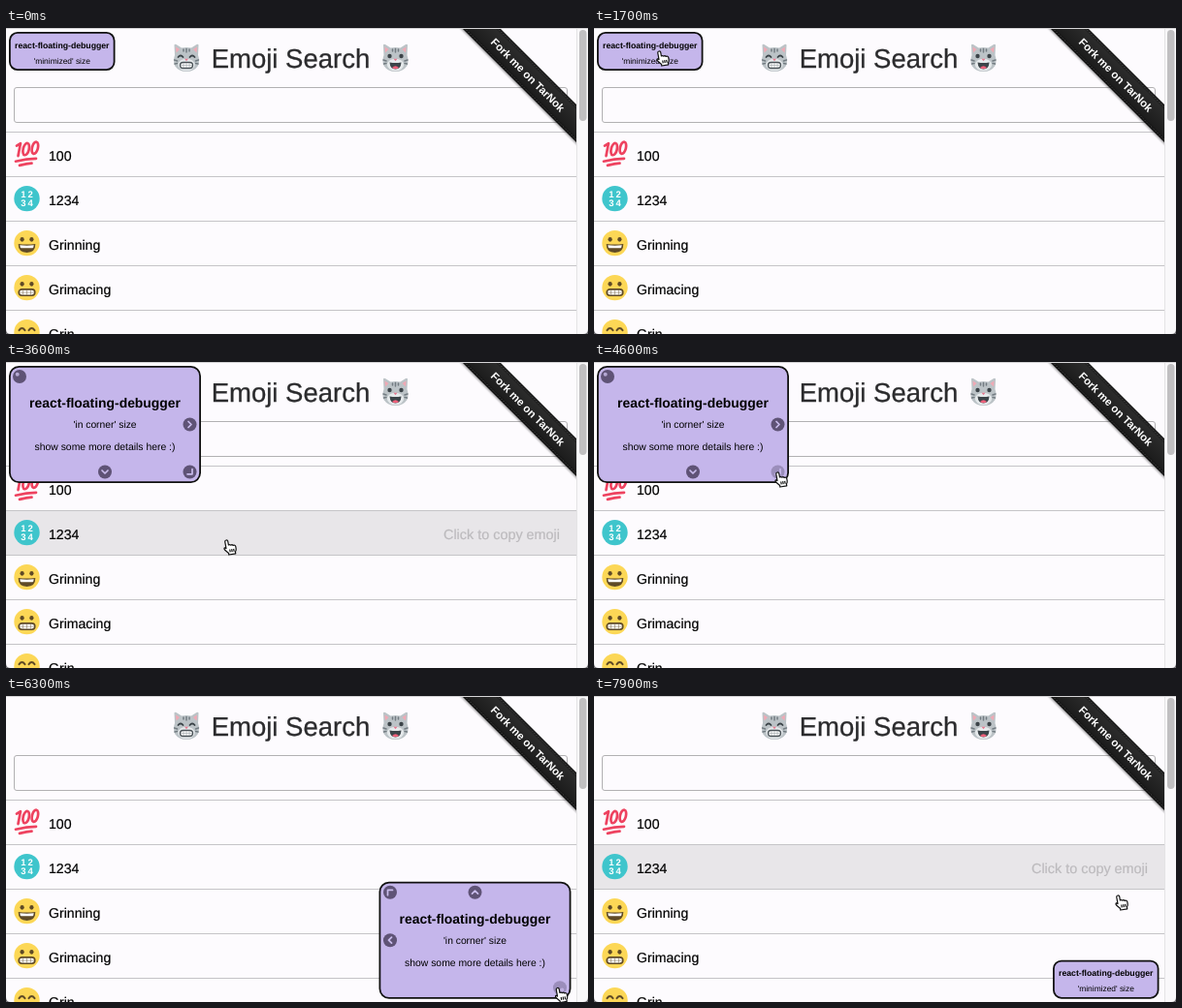
An HTML page for the animation above (8 s loop, 600 by 316 pixels).

```html
<!DOCTYPE html>
<html lang="en">
<head>
<meta charset="utf-8">
<title>Emoji Search</title>
<style>
html, body { margin: 0; width: 100%; height: 100%; overflow: hidden; background: #fdfbfe; }
svg { display: block; width: 600px; height: 316px; font-family: "Liberation Sans", Arial, sans-serif; text-rendering: geometricPrecision; }
.mid { text-anchor: middle; }
.bold { font-weight: bold; }
.line { fill: none; stroke-linecap: round; stroke-linejoin: round; }
</style>
</head>
<body>
<svg viewBox="0 0 600 316">
  <defs>
    <linearGradient id="band" x2="0" y2="1">
      <stop stop-color="#111"/><stop offset=".15" stop-color="#2b2b2b"/>
      <stop offset=".85" stop-color="#1d1d1d"/><stop offset="1" stop-color="#0b0b0b"/>
    </linearGradient>
    <clipPath id="page"><path d="M0 0H588V316H0Z"/></clipPath>
    <filter id="soft"><feGaussianBlur stdDeviation="1.3"/></filter>
    <g id="cat">
      <path fill="#bcc3c7" d="M-12.5-13Q-12.5-15-10.5-14L-5-10.5Q0-11.5 5-10.5L10.5-14Q12.5-15 12.5-13L12-3Q14 3 12 8Q8 14 0 14T-12 8Q-14 3-12-3Z"/>
      <path fill="#efa9b5" d="M-11-11.5L-7-9L-10.5-5.5ZM11-11.5L7-9L10.5-5.5Z"/>
      <path class="line" stroke="#737c82" stroke-width="1.5" d="M0-9.5V-6M-3-9V-7M3-9V-7M-12.5 2L-9.5 3M-12 6L-9.5 5.5M12.5 2L9.5 3M12 6L9.5 5.5"/>
      <ellipse cy="7" rx="8.5" ry="6.3" fill="#e6eaec"/>
      <path fill="#e57b91" d="M-2 .8H2L0 3.2Z"/>
    </g>
    <g id="face"><circle r="13.2" fill="#fcd756"/></g>
  </defs>

  <g id="rows"></g>

  <text class="mid" x="293.5" y="41" font-size="27.5" fill="#2b2b2d" stroke="#2b2b2d" stroke-width=".3">Emoji Search</text>
  <g transform="translate(186 31)">
    <use href="#cat"/>
    <path class="line" stroke="#3c4449" stroke-width="1.8" d="M-8.5-1Q-6-4-3.5-1M3.5-1Q6-4 8.5-1"/>
    <rect x="-6.5" y="4.5" width="13" height="6" rx="3" fill="#fff" stroke="#4a5257" stroke-width="1.3"/>
    <path stroke="#8b9296" stroke-width=".5" d="M-6 7.5H6M-3 5V10M0 5V10M3 5V10"/>
  </g>
  <g transform="translate(401.5 31)">
    <use href="#cat"/>
    <circle cx="-6" cy="-2" r="2.2" fill="#3c4449"/><circle cx="6" cy="-2" r="2.2" fill="#3c4449"/>
    <path fill="#3c4449" d="M-6 4.5Q0 5.5 6 4.5Q5.5 11.5 0 11.5T-6 4.5Z"/>
    <path fill="#f0627c" d="M-3.5 10Q0 6.5 3.5 10Q0 12.4-3.5 10Z"/>
  </g>
  <rect x="8.5" y="61.5" width="570" height="36" rx="2.5" fill="#fdfbfe" stroke="#b2b1b3"/>

  <g clip-path="url(#page)">
    <g transform="translate(538 48.5) rotate(45)">
      <rect x="-120" y="-12" width="240" height="27" fill="#000" opacity=".4" filter="url(#soft)"/>
      <rect x="-120" y="-13.8" width="240" height="27.6" fill="url(#band)"/>
      <path stroke="#666" stroke-width=".6" stroke-dasharray="1.5 1.5" d="M-120-12H120M-120 12H120"/>
      <text class="mid bold" y="4" font-size="11.3" fill="#fff">Fork me on TarNok</text>
    </g>
  </g>
  <path fill="#f9f8fa" d="M588 0H600V316H588Z"/>
  <path stroke="#e4e3e5" d="M588.5 0V316"/>
  <rect x="591" y="2" width="7.5" height="94" rx="3.7" fill="#c0bfc1"/>
  <path stroke="#d6d5d7" d="M0 .5H600"/>

  <g id="panel"></g>
  <g id="hand">
    <path transform="rotate(-10)" fill="#fff" stroke="#111" stroke-width="1.2" stroke-linejoin="round"
      d="M-1.5 8.5V1.3Q-1.4 0 0 0T1.5 1.3V5.3Q3 4.6 3.8 5.9Q5.3 5.2 6 6.5Q8.1 6 8.5 8V10.5Q8.4 12.2 7.2 13.5V15.3H.2V13.8L-3.2 9.6Q-4 7.8-2.8 7.5Q-2 7.5-1.5 8.5ZM2 10V13M4 10V13M6 10V13"/>
  </g>
  <path fill="#77767a" d="M0 311Q0 316 5 316H0ZM600 311Q600 316 595 316H600Z"/>
</svg>
<script>
const $ = id => document.getElementById(id);
const LOOP = 8000, STEP = 100, LAG = 100;
const ROW_TOP = 107, ROW_H = 46;
const OPEN = 2000, MOVE = 4800, SHRINK = 6800;

// Pointer tip: time, x, y
const path = [
  [0, 330, 330], [100, 320, 325], [600, 200, 192], [700, 189, 184], [1000, 187, 181],
  [1300, 130, 115], [1700, 67, 24], [2500, 66, 22], [2800, 75, 30], [3100, 150, 95],
  [3400, 222, 178], [3800, 232, 190], [4100, 208, 140], [4400, 189, 114], [4800, 189, 114],
  [5000, 290, 192], [5100, 339, 232], [5500, 470, 278], [6000, 569, 302], [7200, 567, 300],
  [7500, 530, 175], [7700, 533, 174], [7800, 537, 190], [7900, 540, 206], [8000, 543, 214]
];

function tip(t) {
  t = Math.max(0, t);
  const i = Math.max(1, path.findIndex(k => k[0] >= t));
  const [t0, x0, y0] = path[i - 1], [t1, x1, y1] = path[i];
  const k = (t - t0) / (t1 - t0);
  return [x0 + (x1 - x0) * k, y0 + (y1 - y0) * k];
}

const brown = "#5f4a26";
const eyes = `<ellipse cx="-4.9" cy="-3.8" rx="2.1" ry="2.4" fill="${brown}"/><ellipse cx="4.9" cy="-3.8" rx="2.1" ry="2.4" fill="${brown}"/>`;
const face = inner => `<use href="#face"/>${inner}`;
const rows = [
  ["100", `<g class="line" stroke="#ee4360" stroke-width="2.7">
    <path d="M-10.5-8.5L-6.5-11L-9 2"/>
    <ellipse cx="-.8" cy="-5" rx="3" ry="6.3" transform="rotate(14 -.8 -5)"/>
    <ellipse cx="8.4" cy="-6.3" rx="3" ry="6.3" transform="rotate(14 8.4 -6.3)"/>
    <path d="M-11.5 7.6Q0 5 9.5 4.8M-7.5 11.8Q0 9.8 5 9.6"/></g>`],
  ["1234", `<circle r="13.2" fill="#3fc5cc"/><g class="mid bold" fill="#fff" font-size="9.5">
    <text x="-3.7" y="-1.4">1</text><text x="3.7" y="-1.4">2</text><text x="-3.7" y="7.6">3</text><text x="3.7" y="7.6">4</text></g>`],
  ["Grinning", face(eyes + `<path fill="${brown}" d="M-8.8 1Q0 2 8.8 1Q9 9.8 0 9.8T-8.8 1Z"/><path fill="#fff" d="M-7.2 2.2Q0 3 7.2 2.2Q7 5.2 5.5 5.2H-5.5Q-7 5.2-7.2 2.2Z"/>`)],
  ["Grimacing", face(eyes + `<rect x="-8.3" y="1.8" width="16.6" height="6.4" rx="3.2" fill="#fff" stroke="${brown}" stroke-width="1.6"/>
    <path stroke="${brown}" stroke-width=".4" d="M-7.5 5H7.5M-4 2.5V7.5M0 2.5V7.5M4 2.5V7.5"/>`)],
  ["Grin", face(`<path class="line" stroke="${brown}" stroke-width="2" d="M-8-2Q-5-6-2-2M2-2Q5-6 8-2"/>`)]
];
$("rows").innerHTML = rows.map(([name, icon], i) => {
  const y = ROW_TOP + i * ROW_H;
  return `<g class="hover" visibility="hidden"><rect y="${y}" width="588" height="${ROW_H}" fill="#e8e6e9"/>
    <text x="571" y="${y + 29.5}" text-anchor="end" font-size="14.4" fill="#bcbabd" stroke="#bcbabd" stroke-width=".2">Click to copy emoji</text></g>
    <path stroke="#c5c4c7" d="M0 ${y + .5}H588"/>
    <g transform="translate(21.5 ${y + 23.1})">${icon}</g>
    <text x="44" y="${y + 30.3}" font-size="14.1" stroke="#000" stroke-width=".2">${name}</text>`;
}).join("");
const hovers = [...document.querySelectorAll(".hover")];

// Button: x, y inside the panel, icon path; no path means the minimise ball
const chevron = { right: "M-1.5-3L1.5 0L-1.5 3", left: "M1.5-3L-1.5 0L1.5 3", down: "M-3-1.5L0 1.5L3-1.5", up: "M-3 1.5L0-1.5L3 1.5" };
const topButtons = [[11, 11], [186.5, 60.5, chevron.right], [99, 109.5, chevron.down], [186.5, 109.5, "M2.5-3V2.3H-2.5"]];
const endButtons = [[11.5, 11, "M-2.5 3V-2.3H2.5"], [99, 11, chevron.up], [11.5, 60.5, chevron.left], [186.5, 109.5]];

function button([x, y, icon], hot, side) {
  const mark = icon
    ? `<path class="line" stroke="#c9bcec" stroke-width="1.7" d="${icon}"/>`
    : `<circle cx="${side * 2.3}" cy="${side * 2.3}" r="2" fill="#b5a8d3"/>`;
  return `<g transform="translate(${x} ${y})" opacity="${hot ? .4 : 1}"><circle r="7" fill="#5f5376"/>${mark}</g>`;
}

const label = (x, y, size, text, cls = "") =>
  `<text class="mid ${cls}" x="${x}" y="${y}" font-size="${size}">${text}</text>`;

function panelBox(t) {
  const small = t < OPEN || t >= SHRINK, end = t >= MOVE;
  const w = small ? 109.5 : 198, h = small ? 40 : 121;
  return { small, end, w, h, x: end ? 582.5 - w : 3, y: end ? 312.7 - h : 4 };
}

function drawPanel(t, box, [px, py]) {
  const { small, end, w, h, x, y } = box, mid = w / 2;
  const justMoved = t >= MOVE && t < MOVE + 400;
  const isHot = ([bx, by]) => Math.hypot(px - x - bx, py - y - by) < 9 || justMoved && bx > 180;
  const inner = small
    ? label(mid, 16.8, 8.7, "react-floating-debugger", "bold") + label(mid, 32.5, 8.4, "'minimized' size")
    : label(mid, 43, 13.9, "react-floating-debugger", "bold") + label(mid, 64.3, 10.3, "'in corner' size") +
      label(mid, 87, 10.4, "show some more details here :)") +
      (end ? endButtons : topButtons).map(b => button(b, isHot(b), end ? 1 : -1)).join("");
  $("panel").setAttribute("transform", `translate(${x} ${y})`);
  $("panel").innerHTML = `<rect x=".9" y=".9" width="${w - 1.8}" height="${h - 1.8}" rx="${small ? 8 : 9.5}" fill="#c5b6eb" stroke="#111" stroke-width="1.8"/>${inner}`;
}

function frame(now) {
  const t = Math.floor(now % LOOP / STEP) * STEP;
  const box = panelBox(t), late = tip(t - LAG), [hx, hy] = late;
  const covered = hx >= box.x && hx <= box.x + box.w && hy >= box.y && hy <= box.y + box.h;
  const row = covered || hy > 316 ? -1 : Math.floor((hy - ROW_TOP) / ROW_H);
  hovers.forEach((g, i) => g.setAttribute("visibility", i === row ? "visible" : "hidden"));
  drawPanel(t, box, late);
  $("hand").setAttribute("transform", `translate(${tip(t)})`);
  requestAnimationFrame(frame);
}
requestAnimationFrame(frame);
</script>
</body>
</html>
```
